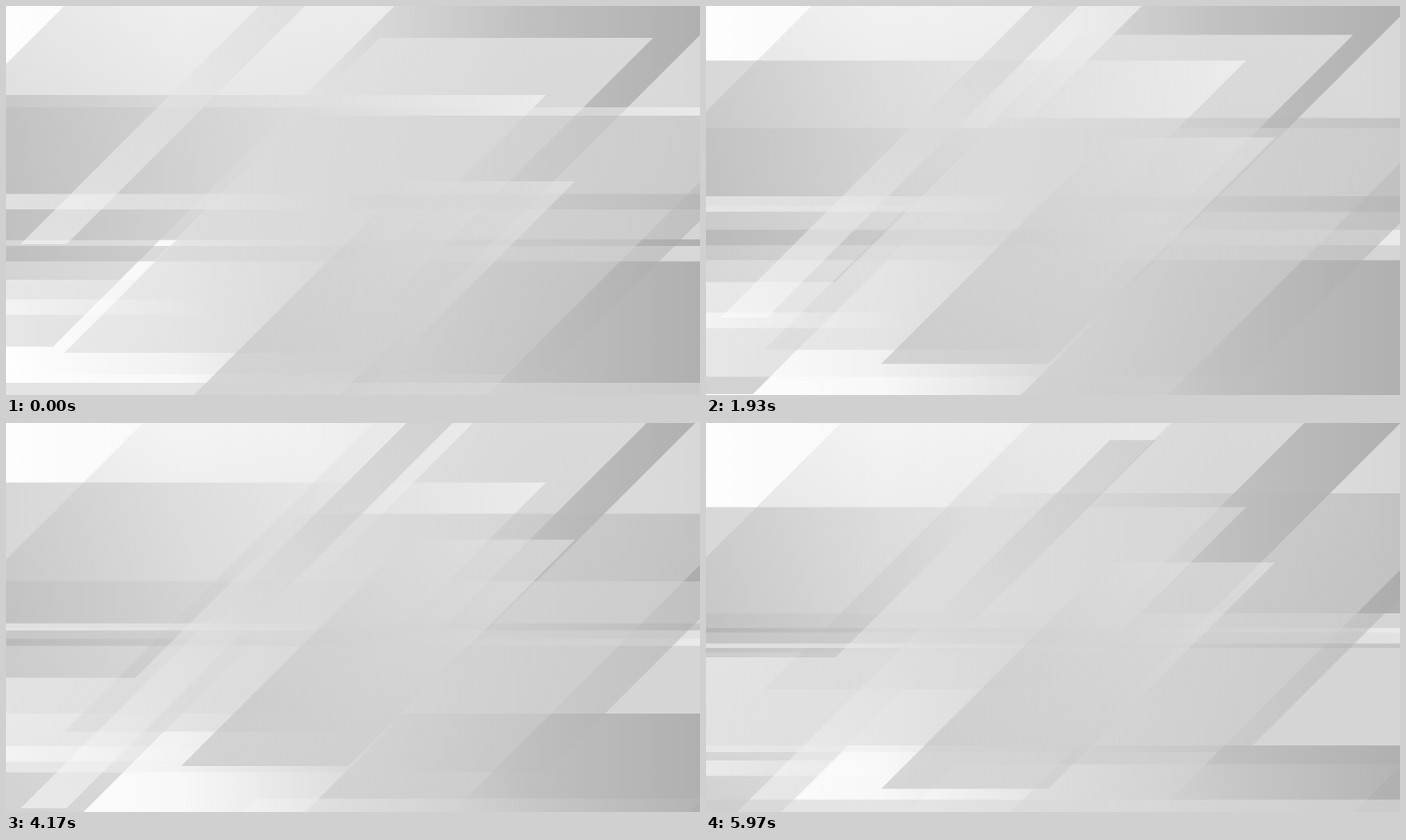
These frames come from a looping animation (739x415 px, 6.01 s). An HTML page with a canvas:

```html
<!DOCTYPE html>
<html lang="en">
<head>
<meta charset="utf-8">
<title>Sliding grey panels</title>
<style>
html, body { margin: 0; width: 100%; height: 100%; overflow: hidden; background: #ddd; }
canvas { display: block; width: 739px; height: 415px; }
</style>
</head>
<body>
<canvas id="stage" width="739" height="415"></canvas>
<script>
const W = 739, H = 415, LOOP = 6010;
const ACROSS = [0, 0, W, 0];
const ctx = document.getElementById('stage').getContext('2d');

function poly(points, line, colors, alpha = 0.5) {
  const g = ctx.createLinearGradient(...line);
  colors.forEach((c, i) => g.addColorStop(i / (colors.length - 1), c));
  ctx.globalAlpha = alpha;
  ctx.fillStyle = g;
  ctx.beginPath();
  points.forEach(p => ctx.lineTo(...p));
  ctx.fill();
}

// Panel with 45 degree sides; left and right are measured on its top edge
function panel(y, h, left, right, colors, line = [left - h, y + h, right, y]) {
  poly([[left, y], [right, y], [right - h, y + h], [left - h, y + h]], line, colors);
}

function band(y, h, ...colors) {
  panel(y, h, -50, 1200, colors, ACROSS);
}

function draw(u) {
  // Each panel drifts along a cubic Bezier over the whole loop
  const v = 1 - u;
  const drift = (a, b, c, d) =>
    a * v ** 3 + 3 * b * u * v * v + 3 * c * u * u * v + d * u ** 3;

  poly([[0, 0], [W, 0], [W, H], [0, H]], ACROSS,
    ['#fdfdfd', '#f8f8f8', '#dcdcdc', '#c0c0c0', '#b0b0b0'], 1);

  const wide = drift(62, 121.4, 164.4, 143.2);
  panel(wide - 398.5, 700, 398.5, 750, ['#a8a8a8', '#fff'],
    [0, wide + 240, 350, wide - 110]);

  const ray = drift(770, 752, 719, 739.8);
  panel(-100, 700, ray + 100, ray + 256.5, ['#c4c4c4', '#fff'], [380, 420, 700, 100]);

  panel(drift(440, 470, 396, 363.5), 80, 267, 741, ['#fff', '#b8b8b8']);
  panel(drift(34, 48.7, 1, -53), 336, 398, 689, ['#bcbcbc', '#fff']);
  panel(drift(95, 31.6, 55, 90.5), 155, -50, 575, ['#b2b2b2', '#fff'], [0, 0, 575, 0]);
  band(drift(108, 123.3, 167, 203.7), 141, '#bcbcbc', '#fafafa');
  band(drift(200.5, 198, 214, 223.7), 16.5, '#fff', '#b4b4b4');
  band(drift(256, 241, 212, 219), 16.5, '#a8a8a8', '#fff');

  // Slanted panel with a tail running out to the left
  const y = drift(117, 136.8, 94.2, 74.7);
  poly([[313, y], [851, y], [575, y + 276], [-9, y + 276], [-9, y + 175], [138, y + 175]],
    ACROSS, ['#fff', '#a8a8a8'], 0.45);

  panel(drift(187, 125.3, 101, 149.7), 241.5, 428, 606, ['#b4b4b4', '#ececec']);
  panel(drift(-160.5, -86, 27, 18), 414.5, 430, 479, ['#fff', '#b8b8b8']);
  panel(drift(313, 326.5, 343.3, 360.4), 16.5, -50, 300, ['#fff', '#fff0'], [0, 0, 220, 0]);
  band(drift(402, 422, 436, 401), 40, '#cacaca', '#e6e6e6');
}

function tick() {
  draw(performance.now() % LOOP / LOOP);
  requestAnimationFrame(tick);
}
tick();
</script>
</body>
</html>
```
